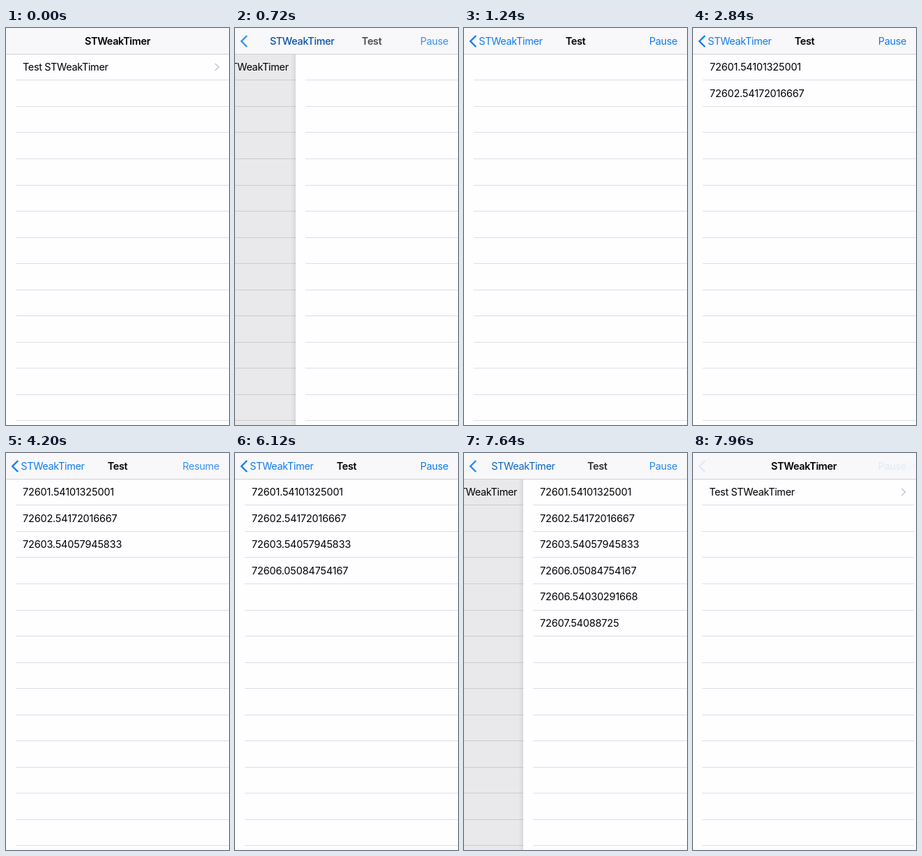
An HTML page that plays this animation: 320 px wide and 569 px high, repeating every 8000 ms.

```html
<!DOCTYPE html>
<html lang="en">
<head>
<meta charset="utf-8">
<title>STWeakTimer</title>
<style>
  html, body { margin: 0; width: 100%; height: 100%; overflow: hidden; background: #fefdff; }
  svg { display: block; width: 100vw; height: 100vh; }
  text { font: 14.5px Inter, Roboto, sans-serif; letter-spacing: -0.38px; fill: #000; }
  .title { font-weight: 600; text-anchor: middle; }
  .value { letter-spacing: -0.19px; }
  .tint { fill: #0f7ef2; }
  .end { text-anchor: end; }
</style>
</head>
<body>
<svg viewBox="0 0 320 569">
  <defs>
    <linearGradient id="shade">
      <stop offset="0" stop-opacity="0"/>
      <stop offset="1" stop-opacity=".1"/>
    </linearGradient>
  </defs>
  <g id="listPage">
    <rect width="320" height="569" fill="#fefdff"/>
    <text x="24" y="61">Test STWeakTimer</text>
    <path d="M300 51l5.3 5-5.3 5" fill="none" stroke="#c7c7cc" stroke-width="1.6"/>
  </g>
  <rect id="dim" width="320" height="569"/>
  <g id="testPage">
    <rect id="shadow" x="-7" width="7" height="569" fill="url(#shade)"/>
    <rect width="320" height="569" fill="#fefdff"/>
  </g>
  <rect width="320" height="37" fill="#f8f7f9"/>
  <rect y="37" width="320" height="1" fill="#d0cfd2"/>
  <text id="listTitle" class="title" y="24">STWeakTimer</text>
  <text id="testTitle" class="title" y="24">Test</text>
  <path id="chevron" d="M17.2 11l-8 8 8 8" fill="none" stroke="#0f7ef2" stroke-width="2.4"/>
  <text id="action" class="tint end" x="306" y="24">Pause</text>
</svg>
<script>
const LOOP = 8000, WIDTH = 320, ROW = 37.547;
const PUSH = 580, POP = 7586, BAR_DELAY = 11;
const PAUSE_DOWN = 3840, PAUSE_UP = 3920, RESUME_DOWN = 5880, RESUME_UP = 6070, BACK_DOWN = 7440;
const TINT = [15, 126, 242];
const ticks = [
  [1550, '72601.54101325001'],
  [2550, '72602.54172016667'],
  [3550, '72603.54057945833'],
  [6070, '72606.05084754167'],
  [6550, '72606.54030291668'],
  [7550, '72607.54088725'],
];

const $ = id => document.getElementById(id);
const [listPage, testPage, dim, shadow, listTitle, testTitle, chevron, action] =
  ['listPage', 'testPage', 'dim', 'shadow', 'listTitle', 'testTitle', 'chevron', 'action'].map($);

function add(parent, tag, attrs, content = '') {
  const el = document.createElementNS('http://www.w3.org/2000/svg', tag);
  for (const key in attrs) el.setAttribute(key, attrs[key]);
  el.textContent = content;
  return parent.appendChild(el);
}

for (const page of [listPage, testPage])
  for (let k = 2; k <= 15; k++)
    add(page, 'rect', { x: 14, y: Math.floor(ROW * k - 0.25), width: 306, height: 1, fill: '#dedde0' });

const rows = ticks.map(([, label], i) =>
  add(testPage, 'text', { class: 'value', x: 24, y: 61 + ROW * i }, label));

// Critically damped spring, as used by navigation transitions.
function spring(ms) {
  const u = Math.max(0, ms) * 0.01826;
  return 1 - (1 + u) * Math.exp(-u);
}
const shown = (t, delay = 0) => spring(t - PUSH - delay) - spring(t - POP - delay);
const shift = (el, x) => el.setAttribute('transform', `translate(${x.toFixed(2)} 0)`);
const fade = (el, alpha) => el.setAttribute('opacity', alpha.toFixed(3));

function actionAlpha(t) {
  if (t >= PAUSE_DOWN && t < PAUSE_UP) return 0.3;
  if (t >= PAUSE_UP && t < RESUME_DOWN) return Math.min(1, 0.3 + 0.7 * (t - PAUSE_UP) / 380);
  if (t >= RESUME_DOWN && t < RESUME_UP) return 0.3;
  return 1;
}

function draw(t) {
  const page = shown(t), bar = Math.max(0, shown(t, BAR_DELAY));
  const barAlpha = Math.sqrt(bar);
  const pressed = t >= BACK_DOWN && t < POP ? 0.3 : 1;

  shift(listPage, -0.3 * WIDTH * page);
  shift(testPage, WIDTH * (1 - page));
  fade(dim, 0.115 * page);
  fade(shadow, page);
  rows.forEach((row, i) => fade(row, t >= ticks[i][0] ? 1 : 0));

  // The list title turns into the back label: black semibold to blue regular.
  shift(listTitle, 160 - 93 * bar);
  listTitle.style.fill = `rgb(${TINT.map(c => Math.round(c * bar))})`;
  listTitle.style.fontWeight = Math.round(600 - 200 * bar);
  fade(listTitle, pressed);
  fade(chevron, barAlpha * pressed);

  shift(testTitle, 160 + (t < POP ? 115 : 162) * (1 - bar));
  fade(testTitle, bar);

  action.textContent = t >= PAUSE_UP && t < RESUME_UP ? 'Resume' : 'Pause';
  fade(action, barAlpha * actionAlpha(t));
}

const start = performance.now();
function frame() {
  draw((performance.now() - start) % LOOP);
  requestAnimationFrame(frame);
}
draw(0);
requestAnimationFrame(frame);
</script>
</body>
</html>
```
